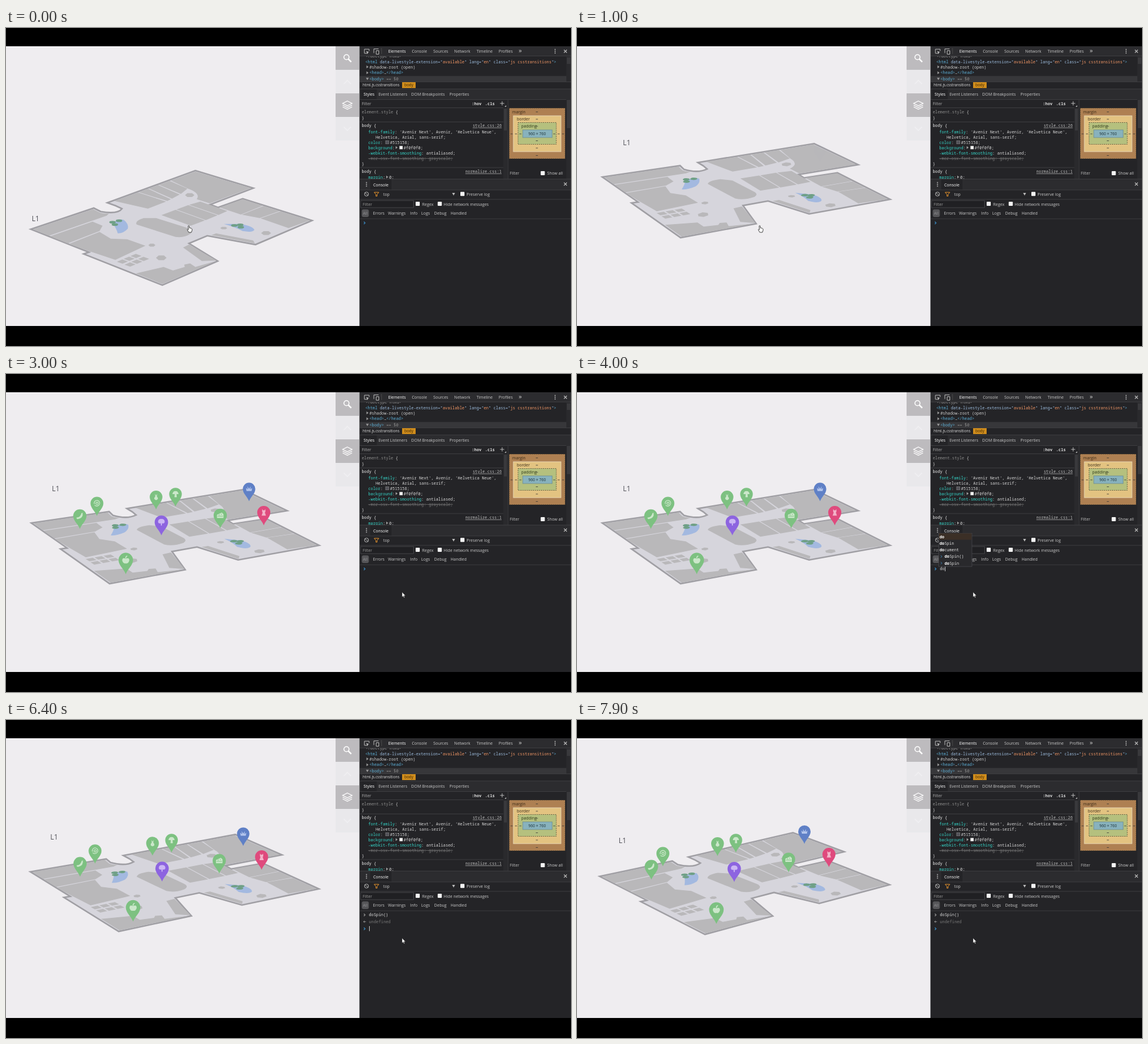
Write an HTML page that moves like this. It is 960x540 px and loops after 8 s.

```html
<!DOCTYPE html>
<html lang="en">
<head>
<meta charset="utf-8">
<title>Map and console</title>
<style>
html, body { margin: 0; width: 960px; height: 540px; overflow: hidden; background: #000; }
svg { display: block; }
text { white-space: pre; font: 6.9px "Open Sans", "Noto Sans", sans-serif; }
.m { font: 6.85px "Noto Sans Mono", "DejaVu Sans Mono", monospace; }
.b { font-weight: bold; }
</style>
</head>
<body>
<svg id="stage" width="960" height="540" viewBox="0 0 960 540"></svg>
<script>
const lerp = (a, b, k) => a + (b - a) * k;
const mix = (p, q, k) => p.map((v, i) => Array.isArray(v) ? mix(v, q[i], k) : lerp(v, q[i], k));
const clamp = v => Math.max(0, Math.min(1, v));
const esc = s => s.replace(/&/g, '&amp;').replace(/</g, '&lt;');

// Markup helpers
const rect = (x, y, w, h, fill, extra = '') => `<rect x="${x}" y="${y}" width="${w}" height="${h}" fill="${fill}" ${extra}/>`;
const path = (d, fill, extra = '') => `<path d="${d}" fill="${fill}" ${extra}/>`;
const line = (d, color, w = 1) => path(d, 'none', `stroke="${color}" stroke-width="${w}"`);
const text = (x, y, s, fill = '#c8c8c8', extra = '') => `<text x="${x}" y="${y}" fill="${fill}" ${extra}>${esc(s)}</text>`;
const code = (x, y, ...parts) => `<text class="m" x="${x}" y="${y}">` +
  parts.map(([s, c, extra = '']) => `<tspan fill="${c}" ${extra}>${esc(s)}</tspan>`).join('') + '</text>';
const check = (x, y) => rect(x, y, 7, 7, '#f4f4f4', 'rx="1"');
const cross = (x, y) => line(`M${x - 2.5},${y - 2.5}l5,5m0,-5l-5,5`, '#bbb', 1.1);
const dots = (x, y) => [-3, 0, 3].map(d => `<circle cx="${x}" cy="${y + d}" r=".9" fill="#bbb"/>`).join('');

// Floor plan, drawn in the opening pose
const FLOOR = 'M42,342 L149,306 L161,312 Q190,317 197,307 L186,302 L172,297 L321.5,242.3 L420,272 L347,300 L360,305 L402,290 L520,327 L424,368 L342,353 L311,366 L360,396 L266,437 L132,384 L141,381Z';
const ROOMS = [
  'M46,342 L148,308 L160,314 Q167,316 175,315 L171,319 L73,353Z',
  'M75,354 L147,329 L164,336 L159,345 L105,366Z',
  'M107,367 L159,346.5 L178,358 L206,359 L237,370 L186,394 L144,380Z',
  'M184,294 L224,279.5 L272,295 L241,307Z',
  'M225.5,279 L241,273.3 L280,291 L274,294Z',
  'M242.5,272.7 L258,267 L295,283 L282,290Z',
  'M259.5,266.5 L278,260 L308,273 L297,282Z',
  'M280,259.3 L321.5,244 L416,272 L346,298 L324,291 Q331,281 309,273Z',
  'M264,318 L288,309 L338,327 L314,336Z',
  'M289.5,308.5 L309.5,301 L359.5,318.3 L339.5,326.5Z',
  'M311,300.5 L330,295 L376,311 L361,317.7Z',
  'M222,334 Q218,328 234,323 L255,323 L306,339 Q318,343 314,349 Q304,357 288,355Z',
  'M363,305 L402,291 L436,302 L399,317Z',
  'M437.5,302.5 L465,311 L431,323 L400.5,317.3Z',
  'M466.5,311.5 L516,327 L480,340 L432.5,323.3Z',
  'M349,352 L357,349 L420,361 L423,366Z',
  'M301,373 L311,368 L358,395 L333,396Z',
  'M221,417 L268,406 L284,412 L304,406 L303,402 L313,400 L322,406 L357,396 L266,435Z'
];
const hexagon = (x, y, r, h) => `M${x - r},${y} L${x - r / 2},${y - h} L${x + r / 2},${y - h} L${x + r},${y} L${x + r / 2},${y + h} L${x - r / 2},${y + h}Z`;
const blob = (x, y, rx, ry) => `M${x - rx},${y} Q${x - rx},${y - ry} ${x},${y - ry} Q${x + rx},${y - ry} ${x + rx},${y} Q${x + rx},${y + ry} ${x},${y + ry} Q${x - rx},${y + ry} ${x - rx},${y}Z`;
const HEXES = [[264, 390.5, 9, 4], [312, 284, 8, 3.3], [442, 348.5, 8.5, 3.3], [248, 369, 6, 2.4], [370, 340, 6, 2]].map(h => hexagon(...h));
const STALLS = [0, 1, 2, 3, 4, 5].map(i => {
  const col = i % 3, row = i > 2, x = 198 + col * 11.5 + row * 13, y = 397 - col * 4.8 + row * 5;
  return `M${x - 9.4},${y + .2} L${x - .2},${y - 3.6} L${x + 9.4},${y - .2} L${x + .2},${y + 3.6}Z`;
});
const PONDS = [
  'M181,332 Q190,324 200,326 Q209,333 207,341 Q200,349 190,349 Q187,339 181,332Z',
  'M370,333 Q384,333 399,333 Q420,337 422,343 Q420,348 402,345 Q389,338 370,333Z'
];
const BUSHES = [[181, 330], [192, 327.5], [185, 334], [388, 335.5], [398, 334.5], [399, 338.5]].map(([x, y]) => blob(x, y, 5.5, 2.3));
const MAP = [
  [FLOOR, '#d6d5dc', 'stroke="#a09fa4" stroke-width="2.6"'],
  ...[...ROOMS, ...HEXES, ...STALLS].map(d => [d, '#b9b8ba']),
  ...PONDS.map(d => [d, '#a3b9e0']),
  ...BUSHES.map(d => [d, '#6fa086'])
];

// Left, top, right and bottom corners of the plan in its three poses
const POSES = [
  [[42, 342], [321.5, 242.3], [520, 327], [266, 437]],
  [[43, 253], [403, 196.3], [532, 291], [176, 356]],
  [[38, 267], [363, 190.7], [531, 278.5], [222, 365]]
];
const LABEL = [[43.5, 328], [78, 199], [70, 210]];

// Matrix taking the unit square to a quadrilateral
function quad([[x0, y0], [x1, y1], [x2, y2], [x3, y3]]) {
  const ax = x1 - x2, ay = y1 - y2, bx = x3 - x2, by = y3 - y2;
  const sx = x0 - x1 + x2 - x3, sy = y0 - y1 + y2 - y3, det = ax * by - bx * ay;
  const g = (sx * by - bx * sy) / det, h = (ax * sy - sx * ay) / det;
  return [x1 - x0 + g * x1, x3 - x0 + h * x3, x0, y1 - y0 + g * y1, y3 - y0 + h * y3, y0, g, h, 1];
}
const inverse = ([a, b, c, d, e, f, g, h, i]) => [
  e * i - f * h, c * h - b * i, b * f - c * e,
  f * g - d * i, a * i - c * g, c * d - a * f,
  d * h - e * g, b * g - a * h, a * e - b * d];
const apply = (m, [x, y, z]) => [0, 3, 6].map(r => m[r] * x + m[r + 1] * y + m[r + 2] * z);
const flat = inverse(quad(POSES[0]));

// Pins: tip in the resting and turned pose, colour, icon tint, icon
const GREEN = ['#7dc181', '#cbe7ca'];
const stroke = (d, c, w = 1.6) => path(d, 'none', `stroke="${c}" stroke-width="${w}" stroke-linecap="round"`);
const PINS = [
  [413, 216, 383.5, 209.5, '#5f80c6', '#b3c5ec', c => path('M-5,4 L-6,-2 L-2.5,1 L-3,-5 L0,0 L3,-5 L2.5,1 L6,-2 L5,4Z', c)],
  [288, 225, 268, 225, ...GREEN, c => path('M-6,0 Q-5,-6 0,-6 Q5,-6 6,0 L2,0 L2.5,6 L-2,6 L-1.5,0Z', c)],
  [255, 230, 237, 231, ...GREEN, c => path('M-2,-6 L0,-3 L2,-6 L1.5,-1 Q4,1 3.5,4 Q0,8 -3.5,4 Q-4,1 -1.5,-1Z', c)],
  [154.5, 241, 145, 249, ...GREEN, c => stroke('M-5,1 A5.2,5.2 0 1 1 4,3 Q0,7 -4,4 M-2,0 A2.2,2.2 0 1 1 -2,.1', c, 1.4)],
  [438, 257, 427, 249, '#df4a7d', '#f3b3c9', c => path('M-3,-6 L-1,-4 L1,-4 L3,-6 L3,-1 L2,0 L4,6 L-4,6 L-2,0 L-3,-1Z', c)],
  [364, 262, 359, 258, ...GREEN, c => path('M-6,-1 L3,-5 L6,-2 L6,5 L-6,5Z', c) + line('M-5,1.5h10M-2,-2v2M2,-3v2', GREEN[0])],
  [125.5, 263, 126.5, 272, ...GREEN, c => path('M5,-6 Q7,4 -4,6 Q-7,5 -6,3 Q1,3 3,-5Z', c)],
  [264, 274, 267.5, 275, '#8d64e0', '#cbb6f4', c => path('M-1,6 L-1,2 Q-6,3 -6,-1 Q-6,-6 0,-6 Q6,-6 6,-1 Q6,3 1,2 L1,6Z', c)],
  [203.5, 340, 240.5, 347, ...GREEN, c => path('M0,-2 Q6,-5 6,1 Q4,7 0,5.5 Q-4,7 -6,1 Q-6,-5 0,-2Z', c) + stroke('M0,-3 Q0,-6 2,-6.5', c)]
];
const PIN = 'M0,0 C-3,-8 -10.6,-13 -10.6,-20.8 A10.6,10.6 0 0 1 10.6,-20.8 C10.6,-13 3,-8 0,0Z';

function sidebar() {
  const W = 'stroke="#fff" stroke-width="1.6"';
  return [31, 71, 111, 151].map((y, i) => rect(560, y, 40, 40, i % 2 ? '#e9e8eb' : '#bdbbbe')).join('') +
    `<circle cx="578.5" cy="49.5" r="4.3" fill="none" ${W}/>` + line('M581.6,52.6l5,5', '#fff', 2.4) +
    line('M574,95l6,-6l6,6M574,168l6,6l6,-6', '#f0eff2', 1.6) +
    path('M580,124l8,4l-8,4l-8,-4Z', 'none', 'stroke="#fff" stroke-width="1.3"') +
    line('M572,131l8,4l8,-4M572,134l8,4l8,-4', '#fff', 1.3);
}

function devtools() {
  const tag = '#5db0d7', attr = '#9bbbdc', quote = '#f29766';
  const prop = '#35d4c7', val = '#d5d5d5', dim = '#8b8b8b', edge = '#3d3d40', track = '#2a2a2d', thumb = '#39393c';
  const rule = y => rect(601, y, 359, 1, edge);
  const row = (y, items, fill) => items.map(([x, s, c]) => text(x, y, s, c || fill)).join('');
  const css = (y, name, value, x = 615.5) => code(x, y, [name, prop], [value, val]);
  const dash = (x, y) => rect(x - 1.7, y, 3.4, .8, '#333');
  const box = (x, y, w, h, fill) => rect(x, y, w, h, fill, 'stroke="#443c2c" stroke-width=".7" stroke-dasharray="2 1.5"');
  return rect(600, 31, 360, 475, '#242427') + rect(600, 31, 1, 475, '#8c8c8e') +
    code(610.5, 50, ['<!doctype html>', '#a0a0a0']) +
    rect(601, 31, 359, 16, '#2c2c2f') + rule(47) +
    line('M615,43h-6v-7h8v3', '#bbb') + path('M612,39l5,2l-2,.8l-1,2.2Z', '#bbb') +
    line('M625,42.5v-7h8M629,38.5h4.5v6h-4.5Z', '#bbb') + rect(637.5, 34, 1, 10, '#4a4a4d') +
    row(41.7, [[649.5, 'Elements', '#fff'], [689.5, 'Console'], [726, 'Sources'], [761.5, 'Network'], [799.5, 'Timeline'], [837, 'Profiles']]) +
    text(871, 42.2, '»', '#ccc', 'style="font-size:11px"') + dots(933, 39.5) + cross(950.5, 39.5) +
    code(610.5, 59.6, ['<html', tag], [' data-livestyle-extension="', attr], ['available', quote], ['" lang="', attr], ['en', quote],
      ['" class="', attr], ['js csstransitions', quote], ['"', attr], ['>', tag]) +
    path('M612.5,63.5l3.5,2.5l-3.5,2.5ZM612.5,73.5l3.5,2.5l-3.5,2.5Z', '#999') +
    code(617.5, 69.2, ['#shadow-root (open)', '#ccc']) +
    code(617.5, 78.4, ['<head>', tag], ['…', '#ccc'], ['</head>', tag]) +
    rect(601, 81.5, 351, 9.5, '#37373a') + path('M611.5,84.5h5l-2.5,4Z', '#999') +
    code(617.5, 88.5, ['<body>', tag], [' == $0', dim]) +
    rect(952, 48, 8, 43, track) + rect(953, 50, 6, 11, thumb) +
    rule(91) + text(606, 99.4, 'html.js.csstransitions', '#e0e0e0', 'style="font-size:6.4px"') +
    rect(673, 92, 23, 10, '#cf8c1c') + text(677, 99.3, 'body', '#3a2400', 'style="font-size:6.4px"') +
    rule(103) + rect(601, 104, 359, 17, '#2c2c2f') + rect(603, 104, 27, 17, '#242427') + rule(121) +
    row(115, [[607.5, 'Styles', '#fff'], [633, 'Event Listeners'], [688.5, 'DOM Breakpoints'], [753.5, 'Properties']]) +
    text(604.5, 130.7, 'Filter', '#aaa') + code(791.5, 130.6, [':hov', '#ddd', 'class="b"']) + code(814, 130.6, ['.cls', '#ddd', 'class="b"']) +
    line('M839.5,128h7M843,124.5v7', '#bbb') + path('M850,131v3h-3Z', '#aaa') + rect(601, 135, 244, 1, edge) +
    code(604.5, 144.7, ['element.style', dim], [' {', val]) + code(604.5, 155.3, ['}', val]) +
    rect(601, 159, 244, 1, edge) +
    code(604.5, 168.4, ['body {', '#eee']) + code(793, 168.4, ['style.css:26', '#bbb', 'text-decoration="underline"']) +
    css(178.8, 'font-family', ": 'Avenir Next', Avenir, 'Helvetica Neue',") +
    code(628, 187.7, ['Helvetica, Arial, sans-serif;', val]) +
    css(196.7, 'color', ': ') + rect(645, 191.3, 5.5, 5.5, '#515158', 'stroke="#888" stroke-width=".6"') + code(652.5, 196.7, ['#515158;', val]) +
    css(205.8, 'background', ':') + path('M662,200.5l3.5,2.5l-3.5,2.5Z', '#999') + rect(668.5, 200.3, 5.5, 5.5, '#f0f0f0') + code(675.5, 205.8, ['#f0f0f0;', val]) +
    css(214.8, '-webkit-font-smoothing', ': antialiased;') +
    code(615.5, 223.8, ['-moz-osx-font-smoothing: grayscale;', '#777', 'text-decoration="line-through"']) +
    code(604.5, 232.8, ['}', val]) + rect(601, 236.5, 244, 1, edge) +
    code(604.5, 246, ['body {', '#eee']) + code(780.5, 246, ['normalize.css:1', '#bbb', 'text-decoration="underline"']) +
    css(256, 'margin', ':') + path('M646,250.5l3.5,2.5l-3.5,2.5Z', '#999') + code(651, 256, ['0;', val]) +
    rect(845, 136, 7, 120, track) + rect(846, 137, 5, 37, thumb) + rect(852.5, 121, 1, 135, edge) +
    box(855, 136, 95, 86, '#ae8052') + rect(862, 149, 81, 61, '#e3c381', 'stroke="#e9dcc0" stroke-width=".8"') +
    box(870, 160.5, 65, 37, '#b5c07e') + rect(878, 173, 50, 13, '#88b2bd', 'stroke="#66858e" stroke-width=".7"') +
    row(144.6, [[860, 'margin']], '#3a2a18') + row(157.4, [[868, 'border']], '#3a2a18') + row(169.2, [[875.5, 'padding']], '#2f3a18') +
    text(902.5, 181.7, '960 × 760', '#1e3238', 'text-anchor="middle" style="font-size:6.6px"') +
    [[902, 142], [902, 154.5], [902, 166.5], [902, 191], [902, 203.5], [902, 216], [859, 179.5], [866.5, 179.5], [874, 179.5], [931.5, 179.5], [939, 179.5], [946.5, 179.5]].map(p => dash(...p)).join('') +
    rect(952, 121, 8, 135, track) + rect(953, 122, 6, 48, thumb) +
    text(856, 249.2, 'Filter', '#bbb') + check(908.5, 243) + text(919.5, 249.2, 'Show all') +
    rect(601, 256, 359, 250, '#242427') + rule(256) + rect(601, 257, 359, 18, '#2c2c2f') + rect(619, 257, 36, 18, '#242427') + rule(274.5) +
    dots(612.5, 265.5) + text(624, 268.5, 'Console', '#fff') + cross(950.5, 265) +
    `<circle cx="612.5" cy="282" r="3.4" fill="none" stroke="#bbb"/>` + line('M610,279.5l5,5', '#bbb') +
    path('M625.5,279h8l-3,3.5v3h-2v-3Z', 'none', 'stroke="#e8942d"') + text(641, 284.5, 'top') + path('M758,280h5l-2.5,4.5Z', '#bbb') +
    check(772, 278.3) + text(782.5, 284.5, 'Preserve log') + rule(290.5) +
    rect(602.5, 293, 90, 12, '#202023', 'stroke="#4d4d50" stroke-width=".8"') + text(606, 301.8, 'Filter', '#999') +
    check(696, 295) + text(707, 301.8, 'Regex') + check(733.5, 295) + text(743.5, 301.8, 'Hide network messages') +
    rect(604.5, 308, 12, 13, '#555558', 'rx="3"') + text(606.5, 317, 'All', '#8f8f92') +
    row(317.2, [[623.5, 'Errors'], [649, 'Warnings'], [686.5, 'Info'], [705.5, 'Logs'], [727.5, 'Debug'], [755.5, 'Handled']]) + rule(323.5);
}

// Typing in the console
const WORD = 'doSpin()', ENTER = 5450;
const KEYS = [3750, 3900, 4300, 4450, 4600, 4750, 4950, 5100];
const HINTS = ['do', 'doSpin', 'document', '> doSpin()', '> doSpin'];
const chevron = (y, c) => line(`M608,${y - 2}l2.2,2l-2.2,2`, c, 1.1);

function popup(typed) {
  const hints = HINTS.filter(h => h.replace('> ', '').startsWith(typed));
  const h = hints.length * 11.3, top = 327 - h;
  return rect(614.5, top, 56.5, h, '#29292c', 'stroke="#4c4c50" stroke-width=".7"') + rect(615, top, 55.5, 11, '#3b2f26') +
    hints.map((s, i) => {
      const y = top + 8 + i * 11.3, old = s[0] === '>', name = s.replace('> ', '');
      return (old ? line(`M618,${y - 4.5}l2,2l-2,2`, '#3f7fae') : '') +
        code(old ? 624.5 : 616, y, [typed, '#fff', 'class="b"'], [name.slice(typed.length), '#ddd']);
    }).join('');
}

function prompt(t) {
  const done = t >= ENTER, typed = done ? '' : WORD.slice(0, KEYS.filter(k => t >= k).length);
  const y = done ? 354.5 : 331, busy = typed && t < 5300;
  const caret = t > 2800 && (busy || (t + 650) % 1000 < 500);
  return (done ? chevron(331, '#999') + code(616.5, 333.4, [WORD, '#ddd']) +
      line('M611.5,342.5h-4m1.8,-1.8l-1.8,1.8l1.8,1.8', '#999', .9) + code(616.5, 344.9, ['undefined', '#777']) : '') +
    chevron(y, '#3b8fc9') + code(616.5, y + 2.4, [typed, '#ddd']) +
    (caret ? rect(617 + typed.length * 4.11, y - 4.5, .8, 8.5, '#eee') : '') +
    (typed && typed !== WORD ? popup(typed) : '');
}

// Pointer
function pointer(t) {
  const a = clamp((t - 1000) / 600), k = a * a * (3 - 2 * a), b = clamp((t - 1950) / 500);
  const x = lerp(312, 672, k) + b, y = lerp(341, 384.5, k) + 40 * Math.sin(Math.PI * k) - 14 * b;
  const at = `transform="translate(${x} ${y})"`;
  if (x < 560) return path('M-2.5,-5 Q-1.5,-6 -.7,-5 L-.3,-1.5 Q3.5,-1.5 4.2,.5 Q4.5,3 3,6 L-1.5,6 L-4,1.5 Q-3.5,0 -2,1.5Z', '#fff', `${at} stroke="#333" stroke-width=".9"`);
  const ring = t < 2200 ? `<circle cx="6.3" cy=".3" r="3.2" fill="none" stroke="#2b9fd8" stroke-width="1.6"/>` : '';
  return `<g ${at}>${path('M0,0V8.2L1.9,6.4L3.2,9.3L4.4,8.7L3.1,6H5.7Z', '#fff', 'stroke="#222" stroke-width=".4"')}${ring}</g>`;
}

// Turn set off by the console command, out and slowly back
function turn(t) {
  const s = t / 1000 - 7.257;
  const deg = Math.min(180, Math.abs(s) * (s < 0 ? 129 : 65));
  return 1.033 * (1 + Math.cos(deg * Math.PI / 180)) / 2;
}

function map(t) {
  const settle = 1 - (1 - clamp(t / 800)) ** 3, k = turn(t);
  const pose = set => t < 1000 ? mix(set[0], set[1], settle) : mix(set[1], set[2], k);
  const m = quad(pose(POSES));
  const project = (_, x, y) => {
    const [u, v, w] = apply(m, apply(flat, [+x, +y, 1]));
    return `${(u / w).toFixed(2)},${(v / w).toFixed(2)}`;
  };
  const [lx, ly] = pose(LABEL);
  const pins = PINS.map(([x0, y0, x1, y1, color, tint, icon], i) => {
    const show = clamp((t - 1000 - i * 35) / 350);
    if (!show) return '';
    const x = lerp(x0, x1, k), y = lerp(y0, y1, k), size = 1 + (y - 216) * .0013;
    const lift = 12 * (1 - show) ** 3;
    return `<g opacity="${show}" transform="translate(${x} ${y + lift}) scale(${size})">${path(PIN, color)}<g transform="translate(0 -20.8) scale(.87)">${icon(tint)}</g></g>`;
  });
  return MAP.map(([d, ...style]) => path(d.replace(/([\d.]+),([\d.]+)/g, project), ...style)).join('') +
    text(lx, ly, 'L1', '#515158', 'style="font-size:12px"') + pins.join('');
}

const stage = document.getElementById('stage');
stage.innerHTML = rect(0, 0, 960, 540, '#000') + rect(0, 31, 600, 475, '#efedf0') +
  '<g id="map"></g>' + sidebar() + devtools() + '<g id="live"></g>';
const mapLayer = document.getElementById('map'), liveLayer = document.getElementById('live');

function draw() {
  const t = performance.now() % 8000;
  mapLayer.innerHTML = map(t);
  liveLayer.innerHTML = prompt(t) + pointer(t);
  requestAnimationFrame(draw);
}
draw();
</script>
</body>
</html>
```
